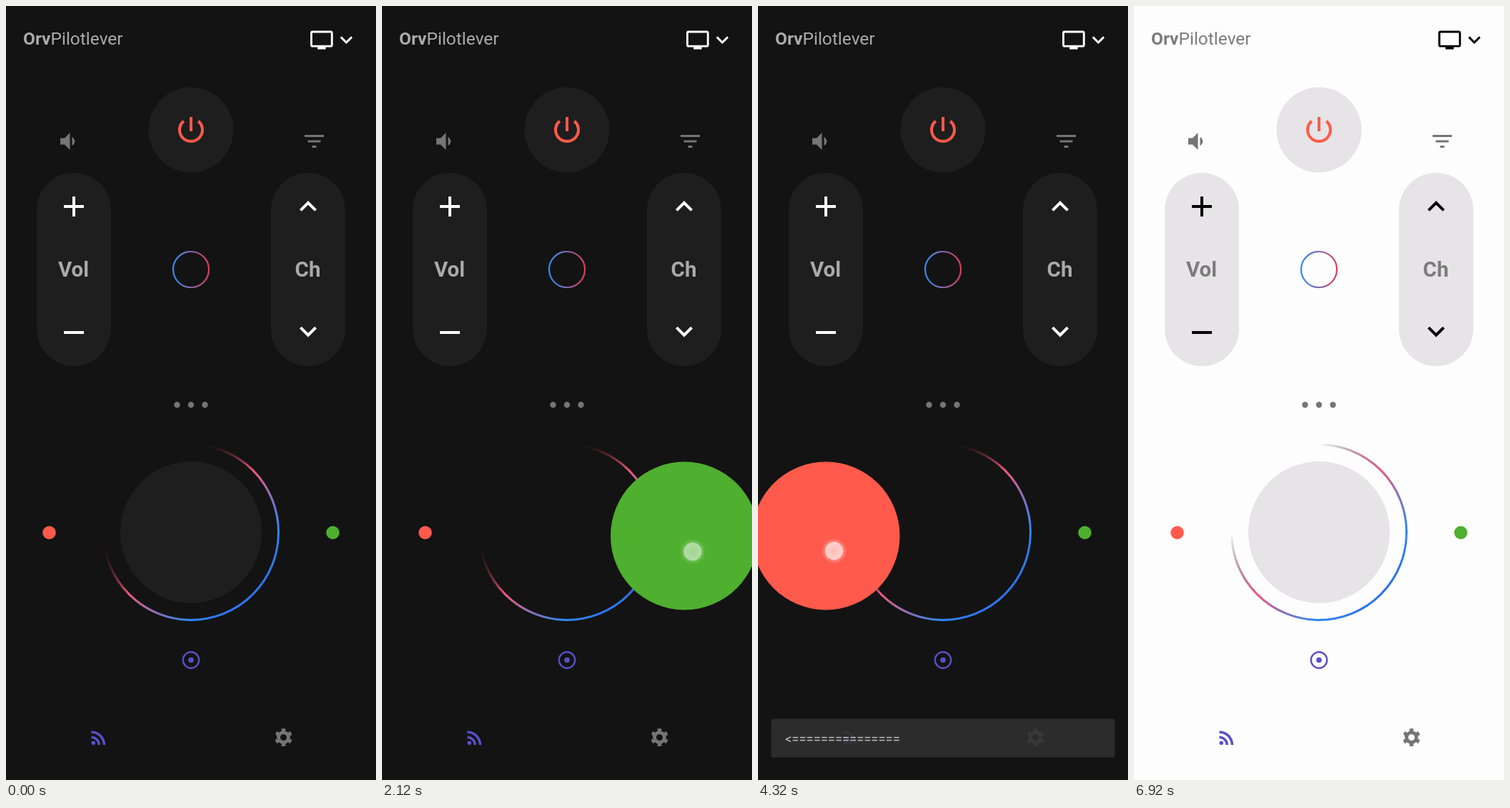
Write an HTML page that moves like this. It is 518 px wide and 1081 px high and loops after 7040 ms.

```html
<!DOCTYPE html>
<html lang="en">
<head>
<meta charset="utf-8">
<title>Remote control</title>
<style>
  html, body { margin: 0; width: 100%; height: 100%; overflow: hidden; background: var(--bg); }
  svg { display: block; width: 100%; height: 100%; font-family: Roboto, sans-serif; }
  .bg { fill: var(--bg); }
  .panel { fill: var(--panel); }
  .ink { fill: var(--ink); }
  .label { fill: var(--label); }
  .grey { fill: #757575; }
  .red { fill: #ff5a4c; }
  .green { fill: #4faf2f; }
  .violet { fill: #5750c6; }
  .line { fill: none; }
  .bold { font-weight: 700; }
  .key { font-size: 29.5px; font-weight: 700; text-anchor: middle; }
</style>
</head>
<body>
<svg viewBox="0 0 518 1081">
  <defs>
    <linearGradient id="arc" gradientUnits="userSpaceOnUse" x1="197.75" y1="674.25" x2="345.6" y2="822.1">
      <stop offset="0" stop-color="#000" stop-opacity="0"/>
      <stop offset=".414" stop-color="#f0587c"/>
      <stop offset=".81" stop-color="#2f88ee"/>
      <stop offset="1" stop-color="#2f72ee"/>
    </linearGradient>
    <linearGradient id="ring">
      <stop offset="0" stop-color="#2f8cf4"/>
      <stop offset="1" stop-color="#d8405f"/>
    </linearGradient>
    <radialGradient id="glow">
      <stop offset="0" stop-color="#fff" stop-opacity=".6"/>
      <stop offset=".66" stop-color="#fff" stop-opacity=".72"/>
      <stop offset=".73" stop-color="#fff" stop-opacity=".25"/>
      <stop offset="1" stop-color="#fff" stop-opacity="0"/>
    </radialGradient>
  </defs>

  <rect class="bg" width="518" height="1081"/>

  <text class="label" x="24" y="53.5" font-size="24.5"><tspan class="bold">Orv</tspan>Pilotlever</text>
  <path class="ink" transform="translate(424.6 30.2) scale(1.44)" d="M21 3H3c-1.1 0-2 .9-2 2v12c0 1.1.9 2 2 2h5v2h8v-2h5c1.1 0 2-.9 2-2V5c0-1.1-.9-2-2-2zm0 14H3V5h18v12z"/>
  <path class="ink" transform="translate(459.2 30) scale(1.44)" d="M7.41 8.59L12 13.17l4.59-4.58L18 10l-6 6-6-6z"/>

  <circle class="panel" cx="259" cy="173" r="59.5"/>
  <path class="red" transform="translate(235 149) scale(2)" d="M13 3h-2v10h2V3zm4.83 2.17l-1.42 1.42C17.99 7.86 19 9.81 19 12c0 3.87-3.13 7-7 7s-7-3.13-7-7c0-2.19 1.01-4.14 2.58-5.42L6.17 5.17C4.23 6.82 3 9.26 3 12c0 4.97 4.03 9 9 9s9-4.03 9-9c0-2.74-1.23-5.18-3.17-6.83z"/>

  <path class="grey" transform="translate(68.5 171) scale(1.5)" d="M18.5 12c0-1.77-1.02-3.29-2.5-4.03v8.05c1.48-.73 2.5-2.25 2.5-4.02zM5 9v6h4l5 5V4L9 9H5z"/>
  <path class="grey" transform="translate(413.5 171) scale(1.5)" d="M10 18h4v-2h-4v2zM3 6v2h18V6H3zm3 7h12v-2H6v2z"/>

  <rect class="panel" x="43" y="233" width="104" height="270" rx="52"/>
  <path class="ink" d="M81 278h12v-12h4v12h12v4H97v12h-4v-12H81zM81 454h28v4H81z"/>
  <text class="label key" x="94.5" y="377.5">Vol</text>

  <rect class="panel" x="371" y="233" width="104" height="270" rx="52"/>
  <path class="ink" transform="translate(399 256) scale(2)" d="M7.41 15.41L12 10.83l4.59 4.58L18 14l-6-6-6 6z"/>
  <path class="ink" transform="translate(399 430.5) scale(2)" d="M7.41 8.59L12 13.17l4.59-4.58L18 10l-6 6-6-6z"/>
  <text class="label key" x="422.5" y="377.5">Ch</text>

  <circle class="line" cx="259" cy="368" r="25" stroke="url(#ring)" stroke-width="2.2"/>
  <g class="grey">
    <circle cx="239.5" cy="557" r="4.2"/>
    <circle cx="259" cy="557" r="4.2"/>
    <circle cx="278.5" cy="557" r="4.2"/>
  </g>

  <path class="line" d="M259 612.5A122.5 122.5 0 1 1 136.5 735" stroke="url(#arc)" stroke-width="3"/>
  <circle class="red" cx="60.5" cy="735.5" r="9.3"/>
  <circle class="green" cx="457.5" cy="735.5" r="9.3"/>
  <circle class="line" cx="259" cy="913.5" r="11.2" stroke="#5750c6" stroke-width="2.4"/>
  <circle class="violet" cx="259" cy="913.5" r="3.8"/>

  <g class="violet" transform="translate(114.4 1006.6) scale(1.27)">
    <circle cx="6.18" cy="17.82" r="2.18"/>
    <path d="M4 4.44v2.83c7.03 0 12.73 5.7 12.73 12.73h2.83c0-8.59-6.97-15.56-15.56-15.56zm0 5.66v2.83c3.9 0 7.07 3.17 7.07 7.07h2.83c0-5.47-4.43-9.9-9.9-9.9z"/>
  </g>
  <g class="line" transform="translate(388.5 1021.5) rotate(15)" stroke="#757575">
    <circle r="6.9" stroke-width="4.8"/>
    <circle r="10.2" stroke-width="4.4" pathLength="12" stroke-dasharray="1 1"/>
  </g>

  <circle id="home" class="panel" cx="259" cy="735" r="99"/>
  <circle id="knob" cy="740" r="103.5"/>
  <g id="snack">
    <rect x="18.5" y="995.5" width="481" height="54" rx="4" fill="#303030"/>
    <text id="message" x="38" y="1029.5" font-size="18.4" fill="#d6d6d6"></text>
  </g>
  <circle id="touch" r="18" fill="url(#glow)"/>
</svg>

<script>
const LOOP = 7040, LAG = 40, THRESHOLD = 100, REST = 263.5;
const [home, knob, snack, message, touch] =
  ['home', 'knob', 'snack', 'message', 'touch'].map(id => document.getElementById(id));

// Each path lists [time, horizontal offset] of the dragged knob.
const drags = [
  { down: 520, start: 620, lift: 2080, drop: 2160, snack: 1000, text: '='.repeat(15) + '>',
    path: [[620, 0], [800, 45], [1000, 122], [1160, 151.5], [1240, 155], [2000, 160]],
    y: () => 762 },
  { down: 2880, start: 3080, lift: 5320, drop: 5400, snack: 3620, text: '<' + '='.repeat(15),
    path: [[3080, 0], [3400, -38], [3520, -80], [3560, -108], [3600, -168.5],
           [4480, -168.5], [4840, -71.5], [5020, -36], [5240, 0]],
    y: t => 761 + 6 * ramp(t, 4480, 4840) }
];
const tap = { down: 6480, lift: 6560 };
const theme = {
  bg: [[19, 19, 19], [253, 253, 253]],
  panel: [[30, 30, 30], [230, 228, 230]],
  ink: [[255, 255, 255], [0, 0, 0]],
  label: [[170, 170, 170], [124, 124, 124]]
};

function ramp(t, from, to) {
  return Math.min(1, Math.max(0, (t - from) / (to - from)));
}

function follow(path, t) {
  let x = path[0][1];
  for (let i = 1; i < path.length; i++) {
    x += (path[i][1] - path[i - 1][1]) * ramp(t, path[i - 1][0], path[i][0]);
  }
  return x;
}

function placeTouch(t, press, x, y) {
  touch.setAttribute('cx', x);
  touch.setAttribute('cy', y);
  touch.style.opacity = t < press.down ? 0 : 1 - ramp(t, press.lift, press.lift + 190);
}

function draw(t) {
  const light = ramp(t, 6640, 6880);
  for (const name in theme) {
    const [a, b] = theme[name];
    const rgb = a.map((v, i) => Math.round(v + (b[i] - v) * light));
    document.documentElement.style.setProperty('--' + name, `rgb(${rgb})`);
  }

  const drag = drags[t < 2600 ? 0 : 1];
  const dragging = t >= drag.start && t < drag.drop;
  const dx = follow(drag.path, t);
  home.style.display = dragging ? 'none' : '';
  knob.style.display = dragging ? '' : 'none';
  knob.setAttribute('cx', REST + dx);
  knob.setAttribute('class', dx > THRESHOLD ? 'green' : dx < -THRESHOLD ? 'red' : 'panel');

  message.textContent = drag.text;
  snack.style.opacity = ramp(t, drag.snack, drag.snack + 168) - ramp(t, drag.snack + 680, drag.snack + 860);

  if (t < 6000) placeTouch(t, drag, REST + 11.5 + follow(drag.path, t + LAG), drag.y(t));
  else placeTouch(t, tap, 266, 163.5);
}

const begin = performance.now();
function tick() {
  draw((performance.now() - begin) % LOOP);
  requestAnimationFrame(tick);
}
tick();
</script>
</body>
</html>
```
